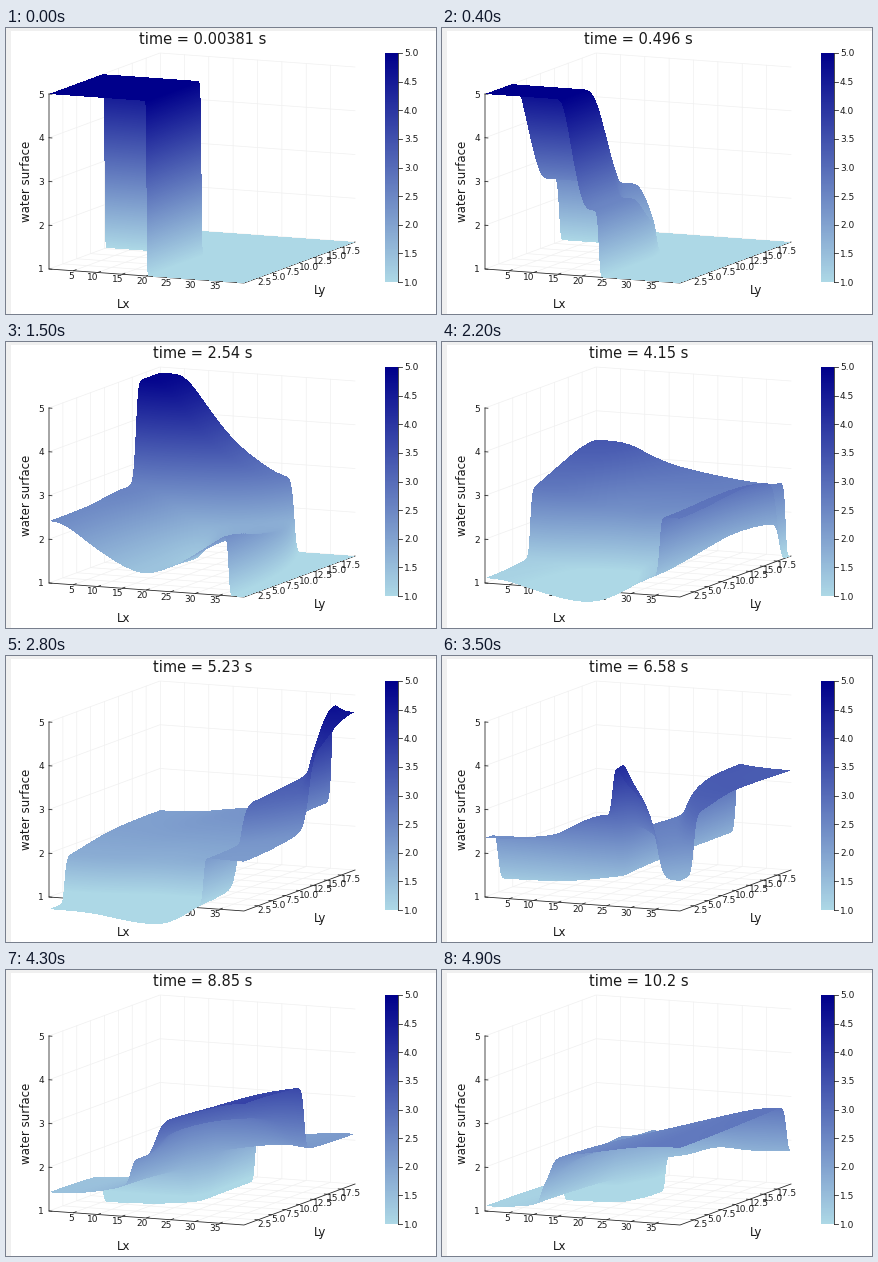
Write a matplotlib script that moves like this. It is 430 px wide and 286 px high and loops after 5000 ms.

```python
import numpy as np
import matplotlib.pyplot as plt
from matplotlib.animation import FuncAnimation
from matplotlib.colors import LinearSegmentedColormap
from matplotlib.patches import Rectangle

W, H, DPI = 430, 286, 72
FRAMES, INTERVAL = 50, 100
LX, LY, DX, G = 40.0, 20.0, 1 / 6, 9.81
NX, NY = round(LX / DX), round(LY / DX)
MAX_DT = 0.008
SLICES = 161

plt.rcParams["font.family"] = "DejaVu Sans"
WATER = LinearSegmentedColormap.from_list("water", ["lightblue", "darkblue"])


def frame_times():
    """Simulated time of each frame: cubic Hermite curve through a few knots."""
    knots = np.array([0, 8, 15, 22, 35, 43, 49], float)
    values = np.array([0.00381, 1.07, 2.54, 4.15, 6.58, 8.85, 10.2])
    slopes = np.gradient(values, knots)
    n = np.arange(FRAMES)
    i = np.clip(np.searchsorted(knots, n, side="right") - 1, 0, len(knots) - 2)
    d = knots[i + 1] - knots[i]
    s = (n - knots[i]) / d
    return ((2 * s**3 - 3 * s**2 + 1) * values[i]
            + (s**3 - 2 * s**2 + s) * d * slopes[i]
            + (3 * s**2 - 2 * s**3) * values[i + 1]
            + (s**3 - s**2) * d * slopes[i + 1])


def flux_difference(q, axis):
    """Rusanov flux difference of (h, hu, hv) along one axis, solid walls."""
    normal = 3 - axis
    pad = [(0, 0)] * 3
    pad[axis] = (1, 1)
    g = np.moveaxis(np.pad(q, pad, mode="edge"), axis, 1)
    g[normal, 0] *= -1
    g[normal, -1] *= -1
    u = g[normal] / g[0]
    f = g * u
    f[normal] += G / 2 * g[0] * g[0]
    speed = np.abs(u) + np.sqrt(G * g[0])
    a = np.maximum(speed[1:], speed[:-1])
    face = (f[:, 1:] + f[:, :-1] - a * (g[:, 1:] - g[:, :-1])) / 2
    return np.moveaxis(np.diff(face, axis=1), 1, axis)


def simulate(times):
    """Water depth at the given times after the dam around one corner breaks."""
    q = np.zeros((3, NY, NX), np.float32)
    q[0] = 1
    q[0, :NY // 2, :NX // 2] = 5
    now, depths = 0.0, []
    for t in times:
        steps = int(np.ceil((t - now) / MAX_DT))
        ratio = float((t - now) / steps / DX)
        for _ in range(steps):
            q = q - ratio * (flux_difference(q, 1) + flux_difference(q, 2))
        now = t
        depths.append(q[0].copy())
    return depths


def project(x, y, z):
    """Orthographic view of the unit box in stage pixels."""
    return 43 + 195 * x + 111 * y, 241 + 14 * x - 41 * y - 175 * z


# Each pixel column sees one straight cut through the box, from back to front.
columns = np.arange(W) + 0.5
inside = (columns > 43) & (columns < 349)
cut_y = np.clip(np.linspace(1, 0, SLICES)[:, None],
                np.clip((columns - 238) / 111, 0, 1),
                np.clip((columns - 43) / 111, 0, 1))
cut_x = np.clip((columns - 43 - 111 * cut_y) / 195, 0, 1)
col = np.minimum((cut_x * (NX - 1)).astype(int), NX - 2)
row = np.minimum((cut_y * (NY - 1)).astype(int), NY - 2)
wx, wy = cut_x * (NX - 1) - col, cut_y * (NY - 1) - row


def render(depth):
    """Depth seen at every pixel; NaN where there is no water."""
    near = depth[row, col] * (1 - wx) + depth[row, col + 1] * wx
    far = depth[row + 1, col] * (1 - wx) + depth[row + 1, col + 1] * wx
    d = near * (1 - wy) + far * wy
    py = project(cut_x, cut_y, (d - 1) / 4)[1]
    image = np.full((H, W), np.nan)
    for k in range(SLICES - 1):
        used = np.flatnonzero(inside & (py[k] != py[k + 1]))
        if not used.size:
            continue
        c = slice(used[0], used[-1] + 1)
        p0, p1, d0, d1 = py[k, c], py[k + 1, c], d[k, c], d[k + 1, c]
        top, bottom = np.minimum(p0, p1), np.maximum(p0, p1)
        r = slice(max(int(top.min()), 0), min(int(bottom.max()) + 1, H))
        y = np.arange(r.start, r.stop)[:, None] + 0.5
        slope = (d1 - d0) / np.where(p1 == p0, 1, p1 - p0)
        np.copyto(image[r, c], d0 + (y - p0) * slope,
                  where=(y >= top) & (y < bottom))
    return image


times = frame_times()
depths = simulate(times)

fig = plt.figure(figsize=(W / DPI, H / DPI), dpi=DPI, facecolor="#f0f0f0")
ax = fig.add_axes([0, 0, 1, 1])
ax.axis("off")
ax.add_patch(Rectangle((5, 3), W - 5, H - 3, fc="white", ec="none", zorder=0))


def line(points, color="#222222", width=0.8):
    ax.plot(*zip(*points), color=color, lw=width, zorder=1)


def path3d(*points, **style):
    line([project(*p) for p in points], **style)


def label(x, y, text, size=9, ha="center", va="center", **kw):
    return ax.text(x, y, text, fontsize=size, ha=ha, va=va, color="#1a1a1a",
                   zorder=2, **kw)


grid = dict(color="#f0f0f0", width=0.7)
for value in range(5, 40, 5):
    x = value / LX
    path3d((x, 0, 0), (x, 1, 0), (x, 1, 1), **grid)
    path3d((x, 0, 0), (x, 0.025, 0))
    px, py = project(x, 0, 0)
    label(px + 1, py + 5.5, str(value), ha="right")
for value in np.arange(2.5, 20, 2.5):
    y = value / LY
    path3d((1, y, 0), (0, y, 0), (0, y, 1), **grid)
    path3d((1, y, 0), (0.985, y, 0))
    px, py = project(1, y, 0)
    label(px - 0.4, py + 4.5, f"{value:.1f}", ha="left")
for value in range(1, 6):
    z = (value - 1) / 4
    path3d((0, 0, z), (0, 1, z), (1, 1, z), **grid)
    path3d((0, 0, z), (0.015, 0, z))
    label(38, project(0, 0, z)[1], str(value), ha="right", va="center_baseline")
path3d((0, 1, 0), (0, 1, 1), **grid)
path3d((0, 0, 1), (0, 0, 0), (1, 0, 0), (1, 1, 0))

label(118, 276, "Lx", 11.8)
label(314.5, 262.5, "Ly", 11.8)
label(20.5, 153, "water surface", 11.7, rotation=90)
title = label(196.5, 16, "", 14.6, va="baseline")

# Colour bar
BAR_TOP, BAR_BOTTOM = 25, 254
ax.imshow(np.linspace(1, 0, 256)[:, None], cmap=WATER, aspect="auto",
          extent=(379, 391.5, BAR_BOTTOM, BAR_TOP), zorder=1)
line([(392, BAR_TOP), (392, BAR_BOTTOM)])
for value in np.arange(1, 5.1, 0.5):
    py = BAR_BOTTOM - (value - 1) / 4 * (BAR_BOTTOM - BAR_TOP)
    line([(392, py), (396, py)])
    label(398, py, f"{value:.1f}", ha="left", va="center_baseline")

water = ax.imshow(np.full((H, W), np.nan), cmap=WATER, vmin=1, vmax=5,
                  aspect="auto", interpolation="nearest",
                  extent=(0, W, H, 0), zorder=3)
ax.set_xlim(0, W)
ax.set_ylim(H, 0)


def update(n):
    water.set_data(render(depths[n]))
    title.set_text(f"time = {times[n]:.3g} s")
    return water, title


anim = FuncAnimation(fig, update, frames=FRAMES, interval=INTERVAL,
                     repeat=True, repeat_delay=0)
plt.show()
```
